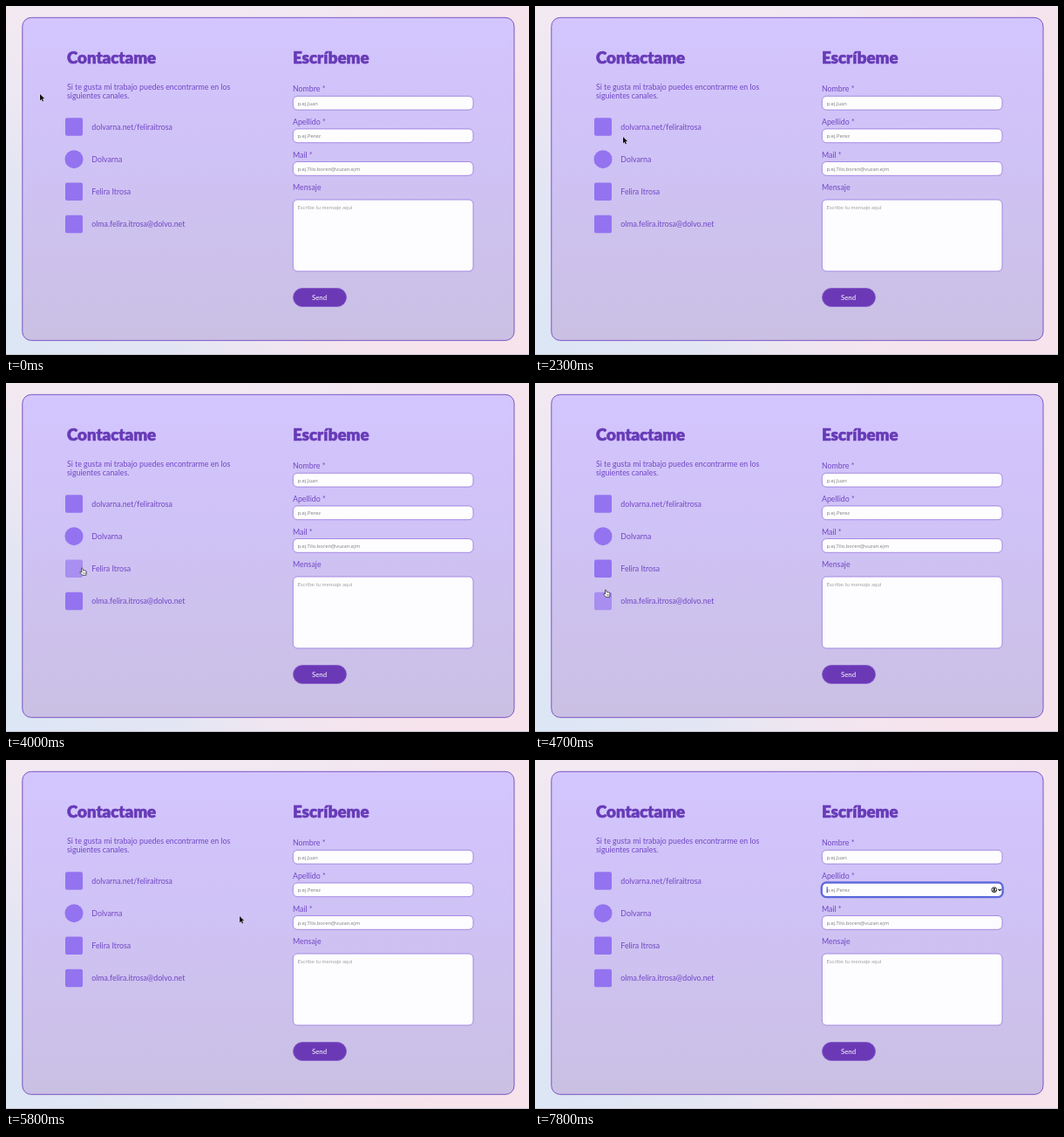
An HTML page that plays this animation: 600x400 px, repeating every 8000 ms.

```html
<!DOCTYPE html>
<html lang="es">
<head>
<meta charset="utf-8">
<style>
  html, body { margin: 0; width: 100%; height: 100%; overflow: hidden; }
  svg { display: block; width: 600px; height: 400px; }
  text { font: 8.8px Lato, sans-serif; fill: #7046c4; }
  .title { font-size: 18.7px; font-weight: 900; fill: #673ab7; stroke: #673ab7; stroke-width: .6; }
  .hint { font: 5.8px "Noto Sans", sans-serif; fill: #858585; }
  .note { font-size: 6.1px; fill: #a3a3a3; }
  .send { font-size: 7.8px; fill: #fff; }
  .field { fill: #fdfcfe; stroke: #9d80df; stroke-width: .9; }
</style>
</head>
<body>
<svg id="stage" viewBox="0 0 600 400">
  <defs>
    <linearGradient id="sky" x2="1" y2=".25">
      <stop offset="0" stop-color="#f2e9f1"/>
      <stop offset=".5" stop-color="#f1e8f2"/>
      <stop offset="1" stop-color="#f6e3ec"/>
    </linearGradient>
    <radialGradient id="mist" gradientUnits="userSpaceOnUse" cx="0" cy="390" r="380">
      <stop offset="0" stop-color="#dce6f5"/>
      <stop offset=".5" stop-color="#e1e5f4" stop-opacity=".85"/>
      <stop offset="1" stop-color="#e8e6f3" stop-opacity="0"/>
    </radialGradient>
    <linearGradient id="panel" x2="0" y2="1">
      <stop offset="0" stop-color="#d3c5fe"/>
      <stop offset=".45" stop-color="#cfc2f5"/>
      <stop offset="1" stop-color="#cac0e3"/>
    </linearGradient>
  </defs>
  <rect width="600" height="400" fill="url(#sky)"/>
  <rect width="600" height="400" fill="url(#mist)"/>
  <rect y="399" width="600" height="1" fill="#c8c5d0"/>
  <rect x="18.8" y="13.3" width="564.2" height="370" rx="10" fill="url(#panel)" stroke="#7b55c4"/>

  <text class="title" x="70" y="66.3">Contactame</text>
  <text class="title" x="329" y="66.3">Escríbeme</text>
  <text x="70" y="95.6">Si te gusta mi trabajo puedes encontrarme en los</text>
  <text x="70" y="106">siguientes canales.</text>
  <g id="links"></g>
  <g id="form"></g>

  <text x="329" y="211">Mensaje</text>
  <rect class="field" x="329.3" y="222" width="206.7" height="82" rx="5"/>
  <text class="note" x="334.5" y="233.2">Escribe tu mensaje aqui</text>
  <rect x="329.5" y="323.5" width="61" height="21" rx="10.5" fill="#6b39b6" stroke="#8257c8" stroke-width=".8"/>
  <text class="send" x="351" y="337">Send</text>

  <g id="focus">
    <rect x="328.7" y="102.8" width="208" height="16.8" rx="5.5" fill="none" stroke="#5a68dc" stroke-width="2.2"/>
    <g fill="none" stroke="#111">
      <circle cx="526.8" cy="111.2" r="2.9" stroke-width=".9"/>
      <path d="M531.5 110.3l1.7 1.7 1.7-1.7" stroke-width="1.1"/>
    </g>
    <circle cx="526.8" cy="110.3" r="1.1" fill="#111"/>
    <path d="M524.8 113a2 1.5 0 0 1 4 0z" fill="#111"/>
    <rect id="caret" x="334.6" y="107.6" width="1" height="7.2" fill="#3545b5"/>
  </g>

  <g id="arrow">
    <path d="M0 0V7.4L1.7 5.8 2.9 8.5 4.1 8 2.9 5.3H5.3Z" fill="#111" stroke="#fff" stroke-width=".6" paint-order="stroke"/>
  </g>
  <g id="hand">
    <path d="M-.7 .4Q0-.5.7.4L1.2 2.7 3.6 3Q5.2 3.3 5.1 5L4.6 8.3H.4L-2.3 5.2Q-2.4 4 -1.2 4.3L-.2 5Z" fill="#fff" stroke="#222" stroke-width=".75" stroke-linejoin="round"/>
    <path d="M1.4 5v1.8M2.7 5v1.8M3.9 5v1.8" stroke="#222" stroke-width=".45"/>
  </g>
  <g id="beam">
    <path d="M-1.7-4.2Q0-4.2 0-3.2Q0-4.2 1.7-4.2M0-3.2V3.2M-1.7 4.2Q0 4.2 0 3.2Q0 4.2 1.7 4.2M-.8 1.6H.8" fill="none" stroke="#222" stroke-width=".8"/>
  </g>
</svg>
<script>
const LOOP = 8000, TICK = 100;
const $ = id => document.getElementById(id);

function add(parent, tag, attrs, text = '') {
  const el = document.createElementNS('http://www.w3.org/2000/svg', tag);
  for (const key in attrs) el.setAttribute(key, attrs[key]);
  el.textContent = text;
  return parent.appendChild(el);
}

const links = [
  { label: 'dolvarna.net/feliraitrosa', y: 138.5, right: 193 },
  { label: 'Dolvarna', y: 175.7, right: 135, round: true },
  { label: 'Felira Itrosa', y: 212.7, right: 145 },
  { label: 'olma.felira.itrosa@dolvo.net', y: 250, right: 208 }
];
for (const link of links) {
  link.icon = link.round
    ? add($('links'), 'circle', { cx: 78, cy: link.y, r: 10.5, fill: '#9373f0' })
    : add($('links'), 'rect', { x: 68, y: link.y - 10.3, width: 20, height: 20.6, rx: 2, fill: '#9373f0' });
  link.text = add($('links'), 'text', { x: 98.3, y: link.y + 3.2 }, link.label);
}

const fields = [['Nombre *', 'p.ej.Juan'], ['Apellido *', 'p.ej.Perez'], ['Mail *', 'p.ej.Tilo.boren@vuzan.ejm']];
const FIELD_GAP = 37.6;
fields.forEach(([label, hint], i) => {
  const y = i * FIELD_GAP;
  add($('form'), 'text', { x: 329, y: 98.3 + y }, label);
  add($('form'), 'rect', { class: 'field', x: 329.3, y: 103.3 + y, width: 206.7, height: 15.8, rx: 5 });
  add($('form'), 'text', { class: 'hint', x: 334.5, y: 113.5 + y }, hint);
});

// Pointer stops: time, x, y
const path = [
  [0, 39, 101], [500, 79, 135], [1300, 79, 135], [1400, 84, 133], [1700, 82, 134],
  [2000, 82, 134], [2100, 110, 139], [2300, 101, 150], [2900, 80, 174], [3300, 105.5, 173],
  [3800, 79, 212], [3900, 79, 212], [4300, 112, 212], [4700, 81, 237], [4800, 80, 241],
  [5300, 150, 249], [5400, 150, 249], [5800, 268, 179], [6300, 339, 112], [6400, 340, 112], [LOOP, 340, 112]
];

function along(t) {
  const i = path.findIndex(stop => stop[0] > t);
  const [t0, x0, y0] = path[i - 1], [t1, x1, y1] = path[i];
  const k = (t - t0) / (t1 - t0);
  return [x0 + (x1 - x0) * k, y0 + (y1 - y0) * k];
}

const show = (el, opacity) => el.setAttribute('opacity', opacity);

function caretOpacity(t) {
  if (t < 7100 || t >= 7600) return 1;
  return t < 7200 || t >= 7500 ? .5 : 0;
}

function draw(time) {
  const t = Math.floor(time % LOOP / TICK) * TICK;
  const [x, y] = along(t);
  let shape = x > 329 && x < 536 && y > 103 && y < 119 ? 'beam' : 'arrow';

  for (const link of links) {
    const onIcon = x > 67 && x < 89 && Math.abs(y - link.y) < 14;
    const onText = x > 98 && x < link.right && Math.abs(y - link.y) < 6;
    show(link.icon, onIcon ? .65 : 1);
    link.text.style.fill = onText ? '#b56be6' : '';
    if (onIcon) shape = 'hand';
    if (onText) shape = 'beam';
  }

  for (const id of ['arrow', 'hand', 'beam']) {
    $(id).setAttribute('transform', `translate(${x} ${y})`);
    show($(id), id === shape && t < 7800 ? 1 : 0);
  }

  show($('focus'), t < 6600 ? 0 : t < 6700 ? .6 : 1);
  $('focus').setAttribute('transform', `translate(0 ${t < 7800 ? 0 : FIELD_GAP})`);
  show($('caret'), caretOpacity(t));
}

const start = performance.now();
function frame() {
  draw(performance.now() - start);
  requestAnimationFrame(frame);
}
frame();
</script>
</body>
</html>
```
